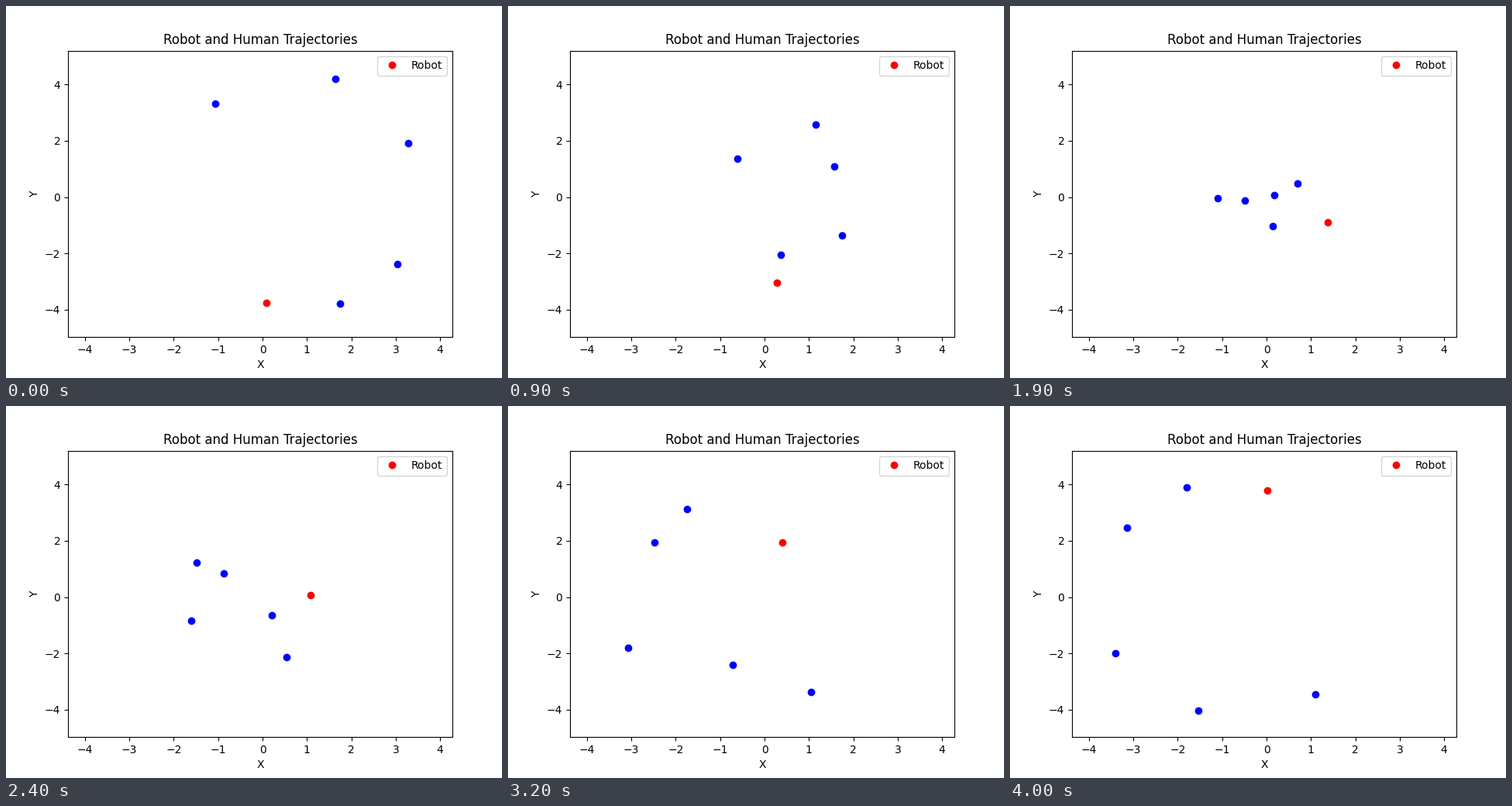
A matplotlib script for the animation above (4100 ms loop, 640 px wide and 480 px high).

```python
import numpy as np
import matplotlib.pyplot as plt
from matplotlib.animation import FuncAnimation
from matplotlib.transforms import Affine2D

FRAMES = 41
STEP_MS = 100
CENTRE = np.array([331, 246.6])  # data origin in stage pixels, y downwards
OVERSHOOT = 1.036                # goals lie slightly outside the start points

# Each human: arrival step, start, then where it is at the VIA steps.
VIA = (9, 19, 32)
HUMANS = [
    (40, (270, 126), (296, 197), (339, 284), (391, 369)),
    (43, (425, 94), (397, 153), (371, 229), (290, 334)),
    (40, (519, 177), (421, 207), (303, 251), (155, 312)),
    (40, (505, 333), (431, 296), (341, 244), (189, 176)),
    (40, (431, 384), (352, 321), (268, 248), (231, 133)),
]

# The robot walks straight between these (step, x, y) turns.
TURNS = [(0, 336, 383), (6, 342, 372), (9, 347, 357), (15, 374, 307),
         (19, 410, 279), (24, 393, 244), (32, 354, 176), (40, 332, 109)]


def hermite(times, p, t):
    """Smooth curve through p that speeds up at first and brakes at the end."""
    v = np.gradient(p, times, axis=0)
    v[0] *= 0.6
    v[-1] *= 0.3
    i = np.clip(np.searchsorted(times, t, side="right") - 1, 0, len(times) - 2)
    h = (times[i + 1] - times[i])[:, None]
    s = (t - times[i])[:, None] / h
    return ((1 + 2 * s) * (1 - s) ** 2 * p[i] + s * (1 - s) ** 2 * h * v[i]
            + s ** 2 * (3 - 2 * s) * p[i + 1] + s ** 2 * (s - 1) * h * v[i + 1])


def cross_circle(arrival, start, *via):
    """Walk from start past the via points to the opposite side."""
    goal = CENTRE + OVERSHOOT * (CENTRE - start)
    times = np.array([0, *VIA, arrival])
    return hermite(times, np.array([start, *via, goal], float), steps)


steps = np.arange(FRAMES)
human_paths = np.array([cross_circle(*h) for h in HUMANS])
turn_t, turn_x, turn_y = zip(*TURNS)
robot_path = np.column_stack([np.interp(steps, turn_t, turn_x),
                              np.interp(steps, turn_t, turn_y)])

fig, ax = plt.subplots(figsize=(6.4, 4.8), dpi=100)
ax.set_title("Robot and Human Trajectories")
ax.set_xlabel("X")
ax.set_ylabel("Y")

stage = Affine2D().scale(1, -1).translate(0.25, 479.75)
robot, = ax.plot([], [], "ro", transform=stage, label="Robot")
humans, = ax.plot([], [], "bo", transform=stage)

ax.set_xlim(-4.381, 4.276)
ax.set_ylim(-4.9714, 5.202)
ax.set_xticks(range(-4, 5))
ax.set_yticks(range(-4, 5, 2))
ax.legend(loc="upper right")


def update(i):
    robot.set_data(robot_path[i:i + 1].T)
    humans.set_data(human_paths[:, i].T)
    return robot, humans


anim = FuncAnimation(fig, update, frames=FRAMES, interval=STEP_MS, repeat=True)
plt.show()
```
